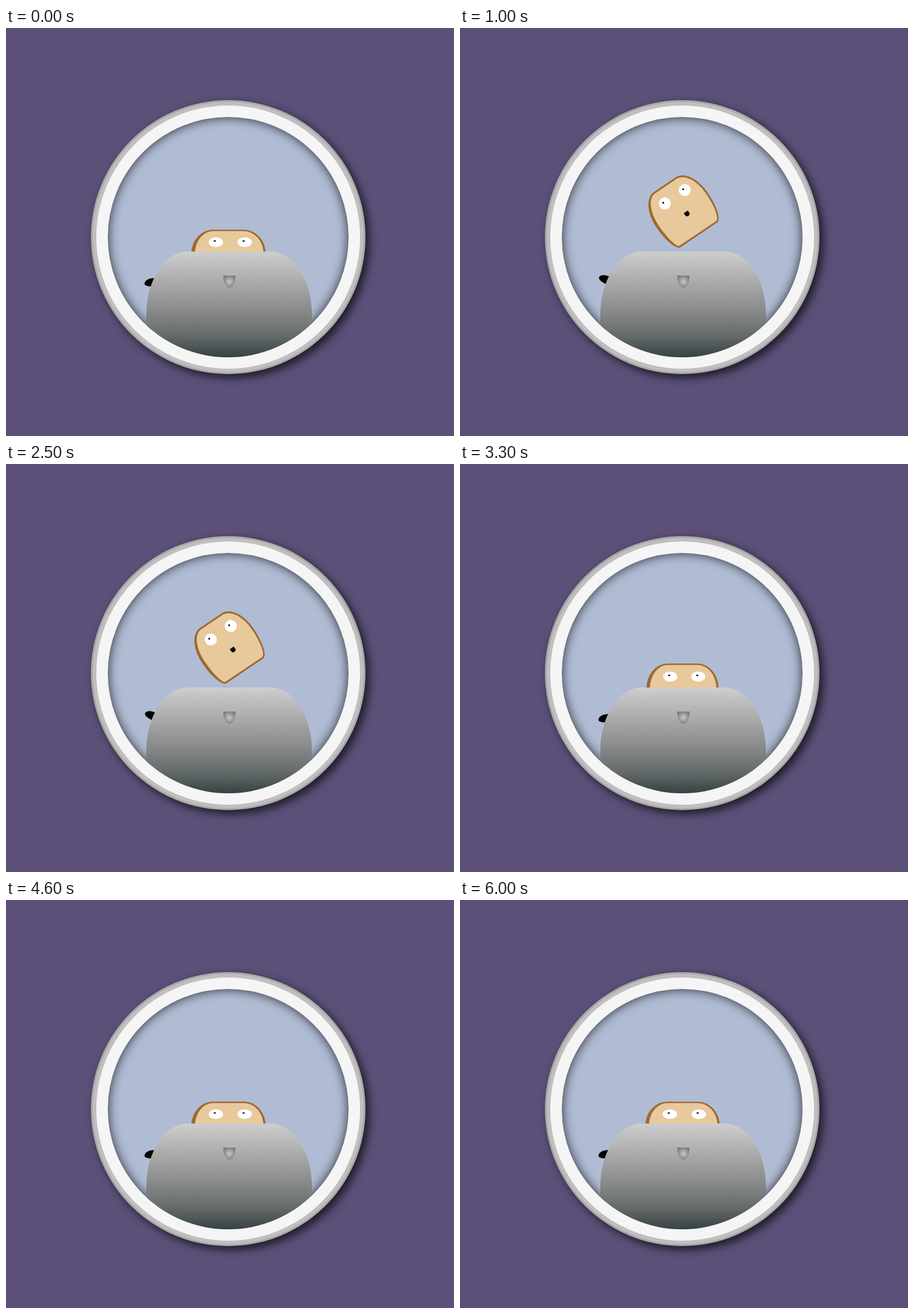
An HTML page for the animation above (6100 ms loop, 744 by 679 pixels).

```html
<!DOCTYPE html>
<html lang="en">
<head>
<meta charset="utf-8">
<title>Toaster</title>
<style>
  html, body { margin: 0; width: 100%; height: 100%; overflow: hidden; background: #5c5079; }
  div, svg { position: absolute; box-sizing: border-box; }
  .window {
    left: 150px; top: 129px; width: 438px; height: 438px;
    border: 19px solid #f5f5f5; border-radius: 50%;
    background: #b0bcd4;
    box-shadow: inset 0 0 18px rgba(0, 0, 0, .8), 0 0 0 6px #bfbfbf, 0 0 0 9px #a9a9a9,
      6px 6px 15px 9px rgba(0, 0, 0, .7);
  }
  .scene { inset: 0; border-radius: 50%; overflow: hidden; }
  .toast {
    left: 148.5px; top: -50.5px; width: 103px; height: 101px;
    border: 3px solid #9c6a30; border-left-width: 5px;
    border-radius: 30px 30px 15px 15px / 50px;
    background: #e7c99c;
  }
  .eye { left: 19px; top: 13px; width: 20px; height: 20px; border-radius: 50%; background: #fff; }
  .eye + .eye { left: 59px; }
  .pupil { left: 7px; top: 5.5px; width: 3px; height: 3px; border-radius: 50%; background: #000; }
  .mouth { left: 45.5px; top: 54px; width: 8px; height: 8px; border-radius: 0 0 50% 50%; background: #000; }
  .lever { left: 0; top: 0; }
  .toaster {
    left: 64px; top: 224px; width: 275px; height: 210px;
    border-radius: 69px 69px 0 0 / 105px 105px 0 0;
    background: linear-gradient(#cecece, #868787 102px, #646a6a 141px, #384243 176px);
  }
  .light {
    left: 128px; top: 40px; width: 20px; height: 20px;
    border-radius: 0 0 50% 50% / 0 0 90% 90%;
    background: radial-gradient(circle, #c8c8c8, #666);
  }
  .light.on { background: radial-gradient(circle, #ec7272, #e03c3c 55%, #b82626); }
</style>
</head>
<body>
<div class="window">
  <div class="scene">
    <div class="toast" id="toast">
      <div class="eye"><div class="pupil"></div></div>
      <div class="eye"><div class="pupil"></div></div>
      <div class="mouth"></div>
    </div>
    <svg class="lever" width="400" height="400">
      <path id="lever" d="M93 268H78C69 268 61 272 61 277.5C61 281 67 282 72 282H93Z"/>
    </svg>
    <div class="toaster"><div class="light" id="light"></div></div>
  </div>
</div>
<script>
  const [toast, lever, light] = ['toast', 'lever', 'light'].map(id => document.getElementById(id));
  const LOOP = 6100, STEP = 100, CYCLE = 1500;
  const REST_BOTTOM = 268, HALF_HEIGHT = 50.5, APEX = 123.8, APEX_TIME = 840;
  const progress = (t, from, to) => Math.min(1, Math.max(0, (t - from) / (to - from)));
  const smooth = x => x * x * (3 - 2 * x);

  function draw(t) {
    // Squash while resting, then a ballistic hop with one full flip.
    const squash = t < APEX_TIME
      ? 0.2 * (1 - progress(t, 0, 530) ** 3)
      : 0.2 * (1 - (1 - progress(t, 1122, CYCLE)) ** 3);
    const scaleY = 1 - squash;
    const gravity = t < APEX_TIME ? 0.00108 : 0.00118;
    const y = Math.min(REST_BOTTOM - HALF_HEIGHT * scaleY, APEX + gravity * (t - APEX_TIME) ** 2);
    const flip = progress(t, 574, 1100);
    const x = -2 * Math.sin(Math.PI * flip);
    toast.style.transform =
      `translate(${x}px, ${y}px) rotate(${360 * smooth(flip)}deg) scale(${1 + squash}, ${scaleY})`;

    const lift = 30 * Math.sin(Math.PI * progress(t, 750, 1250));
    lever.setAttribute('transform', `rotate(${lift} 82 274)`);
    light.classList.toggle('on', t > 350 && t < 950);
  }

  function tick() {
    const time = performance.now() % LOOP;
    draw(Math.floor(time / STEP) * STEP % CYCLE);
    requestAnimationFrame(tick);
  }
  tick();
</script>
</body>
</html>
```
